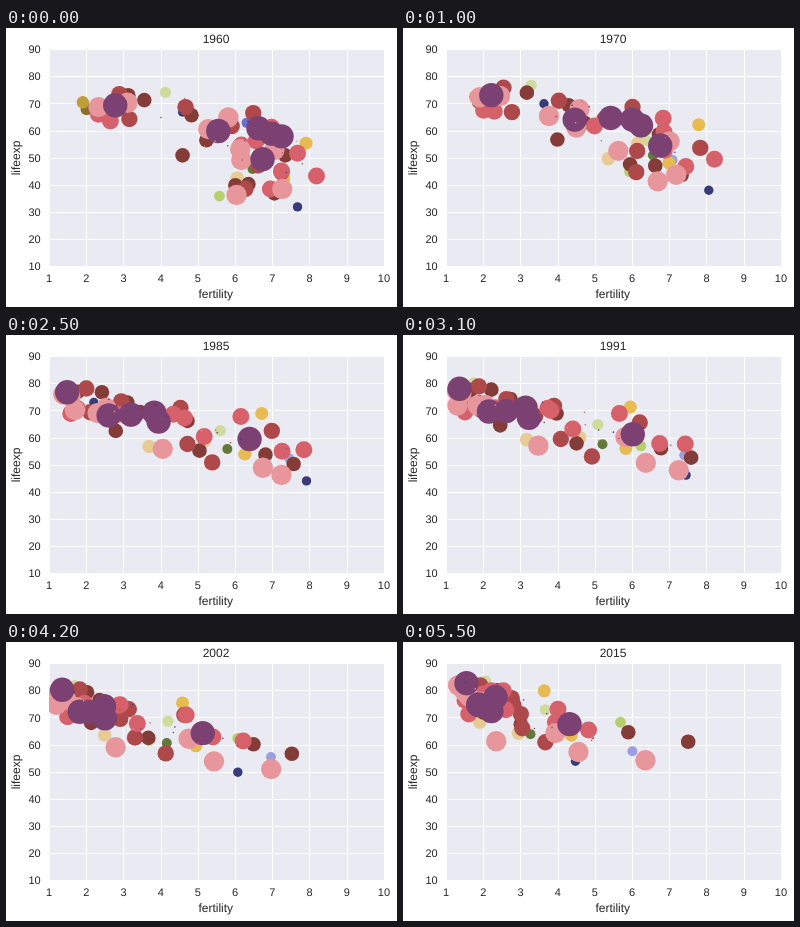
An HTML page that plays this animation: 391 px wide and 279 px high, repeating every 5.6 s.

```html
<!DOCTYPE html>
<html lang="en">
<head>
<meta charset="utf-8">
<title>Fertility and life expectancy</title>
<style>
  html, body { margin: 0; width: 100%; height: 100%; overflow: hidden; background: #fff; }
  svg { display: block; width: 391px; height: 279px; }
  text {
    font: 11px "Liberation Sans", Arial, sans-serif;
    fill: #262626;
    text-anchor: middle;
    text-rendering: geometricPrecision;
  }
  .label { font-size: 12px; }
  .yTick { text-anchor: end; }
  .grid { stroke: #fff; stroke-width: 1; }
</style>
</head>
<body>
<svg viewBox="0 0 391 279">
  <clipPath id="plotArea"><rect x="43" y="21" width="335" height="218"/></clipPath>
  <rect x="43" y="21" width="335" height="218" fill="#eaeaf2"/>
  <g id="axes"></g>
  <g id="bubbles" clip-path="url(#plotArea)"></g>
  <text class="label" id="year" x="210" y="15.2">1960</text>
  <text class="label" x="209.8" y="270">fertility</text>
  <text class="label" transform="translate(13.8 130) rotate(-90)">lifeexp</text>
</svg>
<script>
const FIRST_YEAR = 1960, YEARS = 56, YEAR_MS = 100;
const LAST = YEARS - 1;
const LOOK = {
  navy: ['#393b79', 4.7], blue: ['#6b6ecf', 5], lilac: ['#9c9ede', 5], moss: ['#637939', 5],
  lime: ['#b5cf6b', 5.4], pale: ['#cedb9c', 5.6], olive: ['#8c6d31', 6], khaki: ['#bd9e39', 6.2],
  gold: ['#e7ba52', 6.5], tan: ['#e7cb94', 6.8], brown: ['#843c39', 7.3], brick: ['#ad494a', 8.2],
  red: ['#d6616b', 8.5], pink: ['#e7969c', 10.2], plum: ['#7b4173', 12.2],
};

const axes = document.getElementById('axes');
const layer = document.getElementById('bubbles');
const title = document.getElementById('year');
const bubbles = [];

const plotX = fertility => 43.4 + (fertility - 1) * 37.2;
const plotY = life => 238.5 - (life - 10) * 2.71;

function add(parent, tag, attrs, text = '') {
  const node = document.createElementNS('http://www.w3.org/2000/svg', tag);
  for (const name in attrs) node.setAttribute(name, attrs[name]);
  node.textContent = text;
  return parent.appendChild(node);
}

function drawAxes() {
  for (let value = 1; value <= 10; value++) {
    const x = Math.floor(plotX(value)) + 0.5;
    add(axes, 'line', { class: 'grid', x1: x, x2: x, y1: 21, y2: 239 });
    add(axes, 'text', { x: plotX(value) - 0.3, y: 254.3 }, value);
  }
  for (let value = 10; value <= 90; value += 10) {
    const y = Math.floor(plotY(value)) + 0.5;
    add(axes, 'line', { class: 'grid', x1: 43, x2: 378, y1: y, y2: y });
    add(axes, 'text', { class: 'yTick', x: 34.7, y: plotY(value) + 3.6 }, value);
  }
}

// Start and end are given as fertility, life; hump bows fertility in mid-course.
function bubble(kind, f0, life0, f1, life1, hump = 0, r = LOOK[kind][1]) {
  const node = add(layer, 'circle', { fill: LOOK[kind][0], r });
  bubbles.push({ node, f0, life0, f1, life1, hump });
}

const mix = (a, b, share) => a + (b - a) * share;
const logistic = (t, turn) => 1 / (1 + Math.exp((turn - t) / 9));

// Fertility falls along an S-curve, later where it ends higher.
function fertilityAt(t, { f0, f1, hump }) {
  const turn = 9 * f1 - 2;
  const start = logistic(0, turn);
  const share = (logistic(t, turn) - start) / (logistic(LAST, turn) - start);
  return mix(f0, f1, share) + hump * Math.sin(Math.PI * t / LAST);
}

// Life expectancy rises fast at first, then levels off.
const lifeAt = (t, { life0, life1 }) => mix(life0, life1, (t / LAST) ** 0.75);

function scatterDots(count) {
  let seed = 11;
  const random = (low, high) => {
    seed = (seed * 16807) % 2147483647;
    return mix(low, high, seed / 2147483647);
  };
  const kinds = ['plum', 'red', 'brick', 'navy', 'pink'];
  for (let i = 0; i < count; i++) {
    const f0 = random(4, 7.8), f1 = random(1.4, 5.8);
    bubble(kinds[i % kinds.length], f0, 88 - 5 * f0 + random(-8, 8),
      f1, 86 - 4 * f1 + random(-7, 5), 0, 0.8);
  }
}

drawAxes();

bubble('navy', 7.67, 32, 4.47, 54, 0.9);
bubble('navy', 4.58, 67, 1.5, 78);
bubble('blue', 6.3, 63, 1.9, 75, 0.2);
bubble('lilac', 6.6, 46, 6, 57.7, 0.9);
bubble('moss', 6.46, 46, 3.26, 64, 0.7);
bubble('lime', 5.57, 36, 5.68, 68.4, 0.65);
bubble('pale', 4.12, 74.3, 2.05, 83.6, -0.7);
bubble('pale', 6.6, 50, 3.66, 73);
bubble('olive', 2, 68, 1.5, 77);
bubble('khaki', 1.9, 70.6, 1.5, 78);
bubble('gold', 7.9, 55.5, 3.63, 80, 0.3);
bubble('gold', 7.3, 42.3, 4.36, 63.6, -0.4);
bubble('tan', 6.05, 42.6, 1.9, 68.4, 0.6);
bubble('tan', 6.2, 52, 2.94, 64.4, 0.6);

bubble('brown', 3.12, 73.2, 2.37, 80.2, -0.9);
bubble('brown', 3.55, 71.4, 1.94, 81.3);
bubble('brown', 4.58, 51, 2, 72);
bubble('brown', 4.82, 65.8, 2.2, 79);
bubble('brown', 5.22, 56.6, 2.37, 80);
bubble('brown', 6, 40, 3, 67.7, 0.5);
bubble('brown', 6.35, 40.4, 5.89, 64.7, 0.5);
bubble('brown', 7.05, 37, 7.5, 61.2, 0.5);
bubble('brown', 7.34, 51, 2.3, 78.7, 0.6);

bubble('brick', 2.88, 73.6, 1.91, 82, -0.2);
bubble('brick', 3.15, 64.4, 1.73, 73.6);
bubble('brick', 4.66, 68.8, 2.75, 77.3, -0.7);
bubble('brick', 6.48, 66.6, 2.8, 74.7);
bubble('brick', 5.9, 61.8, 3, 71.4, -0.6);
bubble('brick', 6.27, 38.6, 3.66, 61);
bubble('brick', 7.24, 44.8, 2.75, 77, 2.2);
bubble('brick', 6.62, 47.4, 3.04, 66.2, -0.2);

bubble('red', 2.32, 66.2, 1.6, 71.4, -0.2);
bubble('red', 2.64, 63.7, 1.5, 76.5);
bubble('red', 8.18, 43.4, 4.82, 65.5, 0.2);
bubble('red', 6.97, 61.4, 4, 73.2);
bubble('red', 6.94, 38.6, 3.93, 68.4, 1.2);
bubble('red', 7.67, 51.8, 2.53, 80);
bubble('red', 7.24, 45.2, 2.6, 73, 0.6);
bubble('red', 6.56, 56.3, 1.97, 78.8, 1);
bubble('red', 6.16, 54.8, 2.2, 80, -0.7);

bubble('pink', 2.32, 68.8, 1.32, 82, -0.15);
bubble('pink', 3.1, 70.4, 1.5, 79.5, -0.3);
bubble('pink', 5.27, 60.7, 1.6, 78, -0.8);
bubble('pink', 5.81, 65, 1.9, 76, -0.5);
bubble('pink', 6.13, 53.3, 1.32, 82);
bubble('pink', 6.16, 49.3, 2.34, 61.4, 0.3);
bubble('pink', 6.03, 36.4, 6.35, 54.4, 1.2);
bubble('pink', 7.26, 38.6, 4.55, 57.4);
bubble('pink', 7.05, 53, 3.93, 64.4, 0.2);

bubble('plum', 2.77, 69.5, 1.54, 82.8, -0.35);
bubble('plum', 5.54, 60, 1.86, 75, -0.3);
bubble('plum', 6.62, 61, 1.86, 74.7);
bubble('plum', 6.97, 59, 2.32, 77.7, -0.2);
bubble('plum', 7.24, 58, 2.21, 72.5);
bubble('plum', 6.73, 49.6, 4.31, 67.7, 0.2);

scatterDots(14);

function play(now) {
  const t = Math.floor(now / YEAR_MS) % YEARS;
  for (const b of bubbles) {
    b.node.setAttribute('cx', plotX(fertilityAt(t, b)));
    b.node.setAttribute('cy', plotY(lifeAt(t, b)));
  }
  title.textContent = FIRST_YEAR + t;
  requestAnimationFrame(play);
}

play(0);
</script>
</body>
</html>
```
